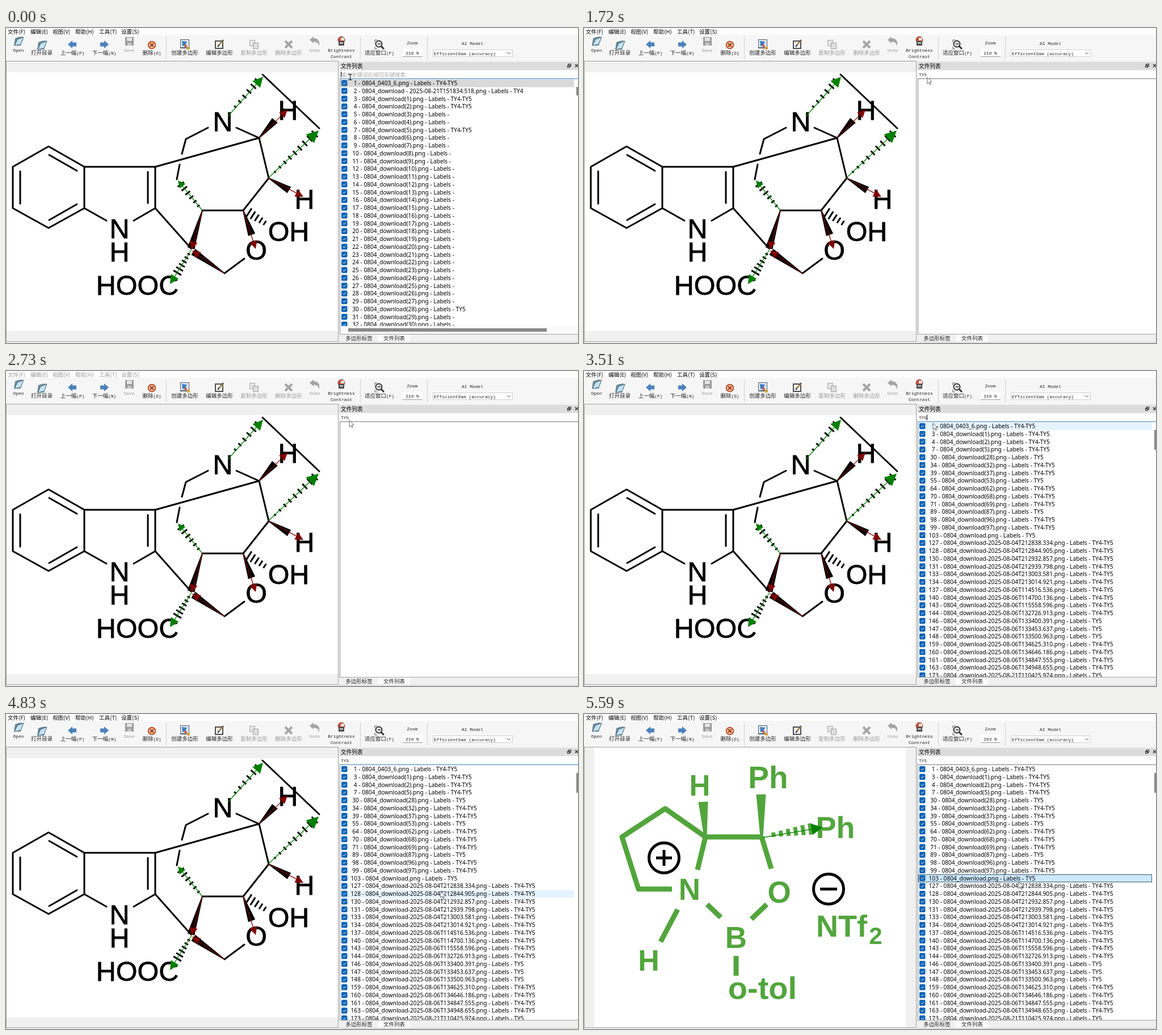
An HTML page with a canvas that plays this animation: 1008x556 px, repeating every 6.39 s.

```html
<!DOCTYPE html>
<html lang="zh">
<head>
<meta charset="utf-8">
<style>
html, body { margin: 0; width: 100%; height: 100%; overflow: hidden; background: #f0f0f0 }
canvas { display: block }
</style>
</head>
<body>
<canvas width="1008" height="556"></canvas>
<script>
const c = document.querySelector('canvas').getContext('2d');
const LOOP = 6390, ROW = 13.75, TOP = 90.7;
const SANS = '"Noto Sans CJK SC", "Noto Sans CJK", sans-serif';
const MONO = '7.9px "Liberation Mono", monospace';
const LIST = '10.2px "Noto Sans", "Open Sans", sans-serif';
const ARIAL = '"Liberation Sans", sans-serif';
const GREY = '#9a9a9a', LEAF = '#52a53c', GREEN = '#008000', RED = '#800000';

// ---- drawing helpers ----
function rect(x, y, w, h, fill) {
  c.fillStyle = fill;
  c.fillRect(x, y, w, h);
}
function frame(x, y, w, h, color) {
  c.strokeStyle = color;
  c.lineWidth = 1;
  c.strokeRect(x + .5, y + .5, w - 1, h - 1);
}
function line(color, width, ...p) {
  c.beginPath();
  for (let i = 0; i < p.length; i += 2) c.lineTo(p[i], p[i + 1]);
  c.strokeStyle = color;
  c.lineWidth = width;
  c.stroke();
}
function poly(fill, ...p) {
  c.beginPath();
  for (let i = 0; i < p.length; i += 2) c.lineTo(p[i], p[i + 1]);
  c.fillStyle = fill;
  c.fill();
}
function ring(x, y, r, color, width, fill) {
  c.beginPath();
  c.arc(x, y, r, 0, 7);
  if (fill) { c.fillStyle = fill; c.fill(); }
  c.strokeStyle = color;
  c.lineWidth = width;
  c.stroke();
}
function text(s, x, y, font, color = '#000', align = 'left') {
  c.font = font;
  c.fillStyle = color;
  c.textAlign = align;
  c.fillText(s, x, y);
}
// Chinese glyphs mixed with half-width Latin; cx is the centre unless left is set
function label(s, cx, y, color = '#222', left) {
  const runs = s.match(/[\u4e00-\u9fff]+|[^\u4e00-\u9fff]+/g).map(r => {
    const font = r > '\u4e00' ? '300 9.5px ' + SANS : MONO;
    c.font = font;
    return { r, font, w: c.measureText(r).width };
  });
  let x = left ? cx : cx - runs.reduce((sum, k) => sum + k.w, 0) / 2;
  for (const k of runs) {
    text(k.r, x, y, k.font, color);
    x += k.w;
  }
}
// tapered bond between two points, w0 and w1 wide at its ends
function wedge(color, x1, y1, x2, y2, w0, w1) {
  const d = Math.hypot(x2 - x1, y2 - y1), nx = (y1 - y2) / d / 2, ny = (x2 - x1) / d / 2;
  poly(color, x1 + nx * w0, y1 + ny * w0, x2 + nx * w1, y2 + ny * w1,
    x2 - nx * w1, y2 - ny * w1, x1 - nx * w0, y1 - ny * w0);
}
// n cross strokes from the first point to the second, growing from w0 to w1
function hash(color, x1, y1, x2, y2, n, w0, w1, thick) {
  const d = Math.hypot(x2 - x1, y2 - y1), nx = (y1 - y2) / d / 2, ny = (x2 - x1) / d / 2;
  for (let i = 0; i < n; i++) {
    const k = i / (n - 1), w = w0 + (w1 - w0) * k;
    const x = x1 + (x2 - x1) * k, y = y1 + (y2 - y1) * k;
    line(color, thick, x + nx * w, y + ny * w, x - nx * w, y - ny * w);
  }
}
function arrow(color, x1, y1, x2, y2, size) {
  const d = Math.hypot(x2 - x1, y2 - y1), ux = (x2 - x1) / d, uy = (y2 - y1) / d;
  const bx = x2 - ux * size, by = y2 - uy * size, h = size * .5;
  line(color, 1.3, x1, y1, bx, by);
  poly(color, x2, y2, bx - uy * h, by + ux * h, bx + uy * h, by - ux * h);
}

// ---- toolbar icons, drawn around 0,0 ----
const icons = {
  folder() {
    poly('#6d8896', -8, 8, -6, -5, 0, -7, 7, -8, 4, 8);
    poly('#c3e2f2', -7, 8, -2, -3, 9, -7, 4, 6);
    line('#41606f', 1, -7, 8, -2, -3, 9, -7, 4, 6, -7, 8);
  },
  back() { poly('#4a82bd', -8, 0, 0, -7, 0, -3.5, 7, -3.5, 7, 3.5, 0, 3.5, 0, 7); },
  next() { c.scale(-1, 1); icons.back(); },
  save() {
    rect(-7, -8, 15, 15, '#9b9b9b');
    rect(-4, -7, 9, 6, '#e4e4e4');
    rect(-3, 2, 7, 5, '#c9c9c9');
  },
  remove() {
    ring(0, 0, 6.3, '#b5522c', 2, '#f6c9a5');
    line('#9b3617', 2, -3, -3, 3, 3);
    line('#9b3617', 2, 3, -3, -3, 3);
  },
  create() {
    rect(-8, -9, 16, 16, '#4f5c66');
    rect(-7, -8, 14, 13, '#dfe9f4');
    poly('#3f7fc0', -5, -6, 4, -5, 1, 2, -4, 3);
    poly('#c24b32', -1, -1, 5, 3, 0, 5);
    rect(4, 4, 5, 5, '#d8a640');
  },
  edit() {
    rect(-8, -7, 15, 15, '#4d4d4d');
    rect(-6, -5, 11, 11, '#f5f5f5');
    line('#333', 2, -3, 4, 7, -8);
    line('#d3a444', 1.5, 0, 1, 6, -6);
  },
  copy() {
    rect(-8, -8, 10, 11, '#a9a9a9');
    rect(-7, -7, 8, 9, '#e6e6e6');
    rect(-2, -3, 10, 11, '#a0a0a0');
    rect(-1, -2, 8, 9, '#dedede');
  },
  cross() {
    line('#a5a5a5', 4, -6, -6, 6, 6);
    line('#a5a5a5', 4, 6, -6, -6, 6);
  },
  undo() {
    poly('#a4a4a4', -9, -3, -2, -9, -2, -6, 4, -5, 8, 0, 8, 8, 5, 2, -2, 0, -2, 3);
  },
  bright() {
    ring(0, -2, 6, '#8f4a3e', 1, '#c74d3c');
    rect(-5, 0, 10, 8, '#4a4a4a');
    rect(-1, -6, 6, 5, '#e8e1d9');
    rect(-3, 2, 6, 3, '#bcbcbc');
  },
  fit() {
    ring(-1, -1, 5.5, '#333', 2, '#eee');
    line('#333', 3, 3, 3, 8, 8);
    rect(-3, -2, 5, 2, '#555');
    line('#555', 1, -8, -4, -8, -8, -4, -8);
    line('#555', 1, -8, 4, -8, 8, -4, 8);
  }
};
const tools = [
  ['folder', 22, 23, 'Open', 42], ['folder', 63, 30, '打开目录', 47],
  ['back', 117, 29, '上一幅(P)', 47], ['next', 173, 29, '下一幅(N)', 47],
  ['save', 217, 24, 'Save', 42, 1], ['remove', 257, 30, '删除(D)', 47],
  ['create', 315, 29, '创建多边形', 47], ['edit', 376, 29, '编辑多边形', 47],
  ['copy', 437, 29, '复制多边形', 47, 1], ['cross', 498, 29, '删除多边形', 47, 1],
  ['undo', 544, 24, 'Undo', 42, 1], ['bright', 591, 23, 'Brightness', 42],
  ['fit', 658, 29, '适应窗口(F)', 47]
];

function chrome(t) {
  rect(0, 0, 1008, 556, '#f0f0f0');
  rect(0, 12, 1008, 46, '#f6f6f6');
  rect(0, 0, 1008, 12, '#fdfdfd');
  const menu = t >= 1850 && t < 3130 ? GREY : '#000';
  ['文件(F)', '编辑(E)', '视图(V)', '帮助(H)', '工具(T)', '设置(S)'].forEach((s, i) =>
    text(s, [3, 43, 82, 122, 164, 203][i], 9.5, '9.6px ' + SANS, menu));
  for (const [icon, x, y, name, base, off] of tools) {
    c.save();
    c.translate(x, y);
    icons[icon]();
    c.restore();
    label(name, x, base, off ? GREY : '#222');
  }
  label('Contrast', 591, 53);
  for (const x of [282, 624, 742]) rect(x, 15, 1, 41, '#cfcfcf');
  label('Zoom', 716, 29);
  rect(699, 37, 35, 14, '#fff');
  rect(699, 50, 35, 1, '#999');
  label(t < 5520 ? '210 %' : '263 %', 716, 47);
  label('AI Model', 822, 30);
  rect(752, 38, 141, 13, '#fff');
  frame(752, 38, 141, 13, '#d0d0d0');
  label('EfficientSam (accuracy)', 754, 48, '#222', true);
  line('#555', 1, 883, 43, 886, 46, 889, 43);
  rect(0, 58, 586, 1, '#a0a0a0');
  rect(0, 58, 1, 496, '#a0a0a0');
  rect(585, 58, 1, 496, '#a0a0a0');
  rect(0, 553, 586, 1, '#a0a0a0');
}

function indole() {
  const K = '#000', bond = (...p) => line(K, 3, ...p);
  rect(1, 78, 584, 457, '#fff');
  c.lineJoin = c.lineCap = 'round';
  bond(138, 245, 75, 209, 12, 245, 12, 318, 75, 353, 138, 318, 138, 245, 263, 245, 263, 318, 225, 340);
  bond(25, 253, 25, 310);
  bond(76, 224, 125, 252);
  bond(76, 339, 125, 311);
  bond(250, 254, 250, 309);
  bond(138, 318, 177, 340);
  bond(263, 245, 446, 194, 406, 176);
  bond(356, 176, 317, 196, 310, 222);
  bond(306, 241, 301, 267);
  bond(446, 194, 463, 265, 418, 322, 346, 322);
  bond(263, 318, 326, 389);
  bond(385, 433, 420, 407);
  bond(452, 82, 552, 177);
  c.lineJoin = 'miter';
  c.lineCap = 'butt';
  wedge(K, 446, 194, 474, 163, 2, 13);
  wedge(K, 463, 265, 499, 286, 2, 13);
  wedge(K, 346, 322, 326, 389, 2, 13);
  wedge(K, 385, 433, 330, 395, 2, 13);
  wedge(K, 418, 322, 433, 365, 2, 13);
  hash(K, 404, 139, 444, 94, 6, 5, 14, 3);
  hash(K, 474, 254, 544, 187, 9, 4, 15, 3);
  hash(K, 339, 314, 308, 276, 6, 5, 14, 3);
  hash(K, 322, 399, 302, 432, 6, 5, 16, 3);
  hash(K, 428, 326, 456, 344, 5, 18, 9, 3);
  for (const [s, x, y] of [['N', 200, 371], ['H', 200, 412], ['N', 382, 182], ['H', 497, 162],
    ['H', 526, 319], ['OH', 498, 376], ['O', 441, 409], ['HOOC', 231.5, 471]]) {
    text(s, x, y, '48.5px ' + ARIAL, K, 'center');
    c.lineWidth = .8;
    c.strokeStyle = K;
    c.strokeText(s, x, y);
  }
  arrow(GREEN, 391, 156, 453, 86, 18);
  arrow(GREEN, 463, 264, 551, 181, 21);
  arrow(GREEN, 346, 322, 303, 269, 13);
  arrow(GREEN, 327, 391, 289, 452, 16);
  arrow(RED, 446, 194, 496, 144, 14);
  arrow(RED, 463, 265, 524, 298, 14);
  arrow(RED, 346, 322, 327, 391, 14);
  arrow(RED, 385, 433, 328, 393, 14);
  arrow(RED, 418, 322, 440, 390, 14);
}

function borate() {
  const bond = (...p) => line(LEAF, 9, ...p);
  rect(18, 59, 549, 494, '#fff');
  c.lineJoin = 'round';
  bond(313, 217, 214, 217, 143, 167, 67, 217, 96, 309, 155, 309);
  c.lineJoin = 'miter';
  bond(214, 217, 200, 275);
  bond(313, 217, 330, 273);
  bond(165, 345, 135, 402);
  bond(217, 336, 241, 359);
  bond(295, 362, 322, 336);
  bond(268, 427, 268, 462);
  wedge(LEAF, 214, 217, 210, 155, 5, 17);
  wedge(LEAF, 313, 217, 312, 142, 5, 17);
  hash(LEAF, 334, 213, 399, 203, 6, 8, 20, 7);
  for (const [s, x, y, size] of [['H', 204, 144, 51], ['Ph', 324.5, 131, 55], ['Ph', 443, 219, 54],
    ['N', 186, 328, 53], ['O', 344, 333, 53], ['B', 268, 413, 53], ['H', 114, 453, 52],
    ['o-tol', 314.5, 503, 56], ['NTf', 454, 393, 54], ['2', 514, 406, 42]])
    text(s, x, y, `bold ${size}px ${ARIAL}`, LEAF, 'center');
  ring(141, 254, 26.5, '#000', 5);
  line('#000', 5, 127, 254, 155, 254);
  line('#000', 5, 141, 240, 141, 268);
  ring(431, 309, 26.5, '#000', 5);
  line('#000', 5, 416, 309, 446, 309);
  arrow(GREEN, 315, 218, 421, 200, 20);
}

// ---- file list ----
const BOTH = 'TY4-TY5';
const row = (n, name, tag) => `${String(n).padStart(3)} - 0804_${name}.png - Labels - ${tag}`;
const numbered = (n, tag) => row(n, `download(${n - 2})`, tag);
const first = row(1, '0403_6', BOTH);
const all = [first, row(2, 'download - 2025-08-21T151834.518', 'TY4')];
for (let n = 3; n <= 32; n++)
  all.push(numbered(n, [3, 4, 7].includes(n) ? BOTH : n == 30 ? 'TY5' : ''));
const found = [first,
  ...[3, 4, 7, 30, 34, 39, 55, 64, 70, 71, 89, 98, 99].map(n =>
    numbered(n, [30, 55, 89].includes(n) ? 'TY5' : BOTH)),
  row(103, 'download', 'TY5'),
  ...`127 04T212838.334
128 04T212844.905
130 04T212932.857
131 04T212939.798
133 04T213003.581
134 04T213014.921
137 06T114516.536
140 06T114700.136
143 06T115558.596
144 06T132726.913
146 06T133400.391
147 06T133453.637
148 06T133500.963
159 06T134625.310
160 06T134646.186
161 06T134847.555
163 06T134948.655
173 21T110425.974`.split('\n').map(s => {
    const [n, stamp] = s.split(' ');
    return row(n, 'download-2025-08-' + stamp, [146, 147, 148, 173].includes(+n) ? 'TY5' : BOTH);
  })];

function fileList(t, mouseY) {
  const full = t < 1720, rows = full ? all : t < 3170 ? [] : found;
  const bottom = full ? 526 : 540;
  rect(588, 90, 420, 451, '#fff');
  c.save();
  c.beginPath();
  c.rect(588, 90, 420, bottom - 90);
  c.clip();
  const hover = full ? -1 : Math.floor((mouseY - TOP) / ROW);
  rows.forEach((s, i) => {
    const y = TOP + i * ROW, picked = t >= 5180 && i == 14;
    if (full && !i) rect(589, y, 412, ROW, '#d9d9d9');
    if (picked) {
      rect(589, y, 412, ROW, '#cce8ff');
      frame(589, Math.round(y), 412, 14, '#3d5a73');
    } else if (i == hover) rect(589, y, 412, ROW, '#e5f3ff');
    c.beginPath();
    c.roundRect(591, y + 1.3, 10.5, 10.5, 2);
    c.fillStyle = '#0a63b5';
    c.fill();
    line('#fff', 1, 593.7, y + 6.6, 595.6, y + 8.5, 599, y + 5);
    text(s, 607.5, y + 10.3, LIST);
  });
  c.restore();
  rect(588, 90, 1, 451, '#8c8c8c');
  rect(588, 540, 420, 1, '#a0a0a0');
  if (full) {
    rect(589, 526, 419, 14, '#fafafa');
    rect(603, 530, 350, 6, '#8a8a8a');
  }
  if (rows.length) rect(1005, 104, 3, full ? 15 : 35, '#8a8a8a');
}

function dock(t, mouseY) {
  rect(588, 60, 420, 14, '#dcdcdc');
  text('文件列表', 590, 70.5, '9.7px ' + SANS);
  frame(989, 65, 5, 5, '#222');
  frame(991, 63, 5, 5, '#222');
  line('#222', 1.2, 1003, 64, 1008, 69);
  line('#222', 1.2, 1008, 64, 1003, 69);
  rect(588, 75, 420, 15, '#fff');
  fileList(t, mouseY);
  const focus = t < 1720 || t >= 3130 && t < 5180;
  rect(588, 89, 420, 1, focus ? '#3f7fb5' : '#777');

  const typed = 'TY5'.slice(0, t < 80 ? 0 : t < 220 ? 1 : t < 860 ? 2 : 3);
  if (typed) label(typed, 590, 85, '#222', true);
  else label('输入关键词后按回车键搜索', 590, 85.5, '#aaa', true);
  const blink = t >= 3130 && t < 5520 && (t - 3100) % 1040 < 520;
  if (t < 1470 || blink) rect(590 + typed.length * 4.75 | 0, 77, 1, 10, '#000');

  rect(655, 541, 57, 13, '#fbfbfb');
  label('多边形标签', 622, 550.5);
  label('文件列表', 684, 551);
  rect(588, 554, 420, 1, '#d0d0d0');
}

// ---- pop-up and pointer ----
const clamp = v => Math.max(0, Math.min(1, v));
function popup(t) {
  const alpha = Math.min(clamp((t - 1800) / 250), clamp((2730 - t) / 150));
  if (!alpha) return;
  c.globalAlpha = alpha;
  rect(400, 205, 206, 179, '#f0f0f0');
  rect(400, 205, 206, 19, '#fff');
  frame(400, 205, 206, 179, '#b0b0b0');
  rect(416, 274, 174, 16, '#fff');
  rect(416, 289, 174, 1, '#777');
  if (t < 2340) rect(419, 277, 1, 10, '#000');
  c.globalAlpha = 1;
}

const path = [[0, 605, 87], [3370, 605, 87], [3510, 615, 92], [4130, 640, 100], [4220, 662, 108],
  [4360, 721, 150], [4660, 764, 308], [4830, 766, 313], [4970, 766, 304], [5140, 766, 296.5], [LOOP, 766, 296.5]];
function mouse(t) {
  const i = path.findIndex(p => p[0] > t), a = path[i - 1], b = path[i];
  const k = (t - a[0]) / (b[0] - a[0]);
  return [a[1] + (b[1] - a[1]) * k, a[2] + (b[2] - a[2]) * k];
}
function pointer(t, x, y) {
  if (t < 1720) {
    line('#000', 1, 603, 81.5, 610, 81.5);
    line('#000', 1, 606.5, 81, 606.5, 92);
    line('#000', 1, 603, 91.5, 610, 91.5);
    return;
  }
  const shape = [0, 0, 0, 11.5, 2.7, 9, 4.6, 13, 6.3, 12.2, 4.5, 8.3, 8, 8, 0, 0];
  const p = shape.map((v, i) => v + (i % 2 ? y : x));
  poly('#fff', ...p);
  line('#444', .8, ...p);
}

function draw(now) {
  const t = now % LOOP, [x, y] = mouse(t);
  chrome(t);
  if (t < 5520) indole();
  else borate();
  dock(t, y);
  popup(t);
  pointer(t, x, y);
  requestAnimationFrame(draw);
}
requestAnimationFrame(draw);
</script>
</body>
</html>
```
